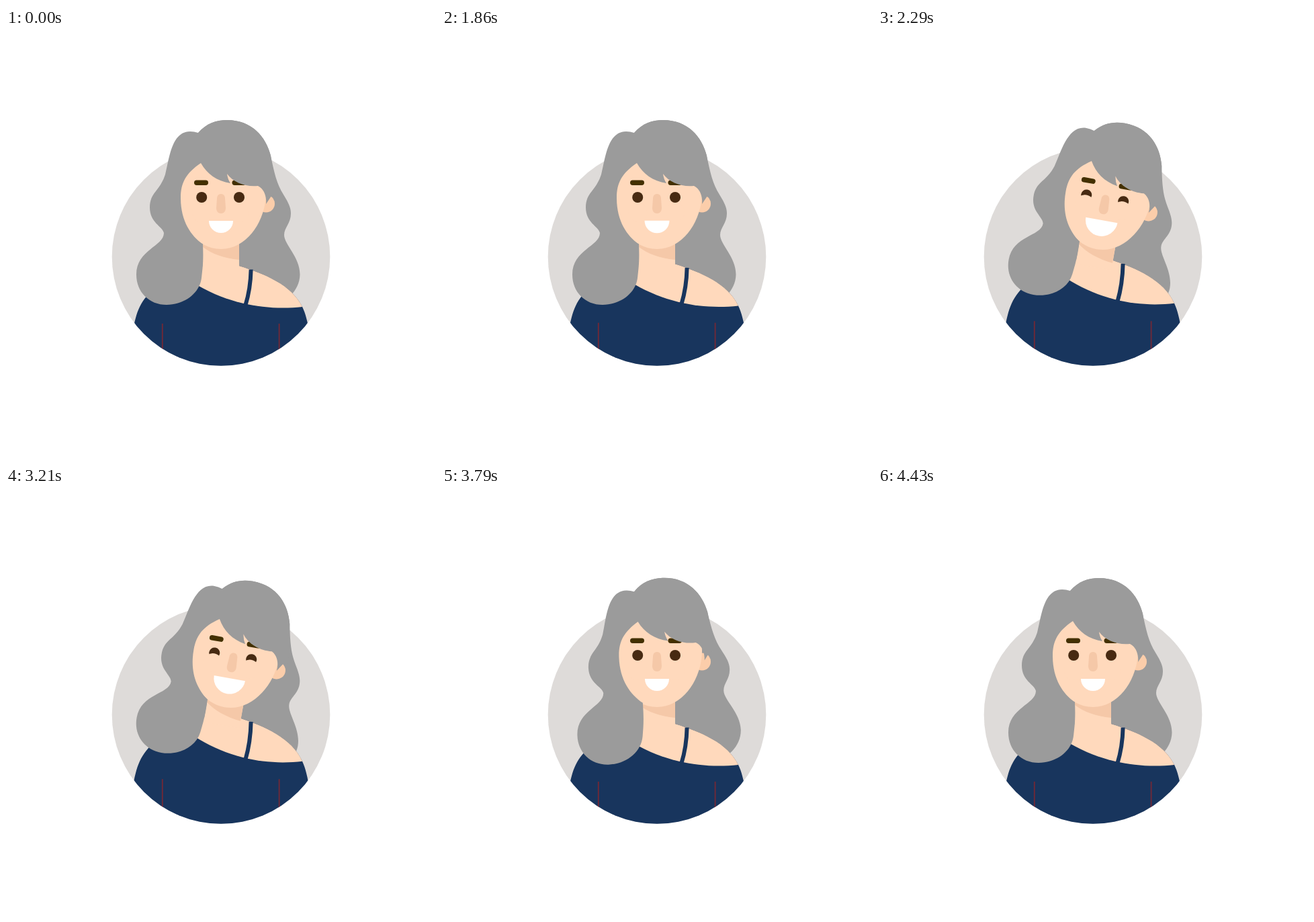
Animation of 640x640 px, one loop 4780 ms. Source, as an HTML page:

```html
<!DOCTYPE html>
<html lang="en">
<head>
<meta charset="utf-8">
<title>Smiling woman</title>
<style>
  html, body { margin: 0; width: 100%; height: 100%; overflow: hidden; background: #fff; }
  svg { display: block; width: 100vw; height: 100vh; }
  .hair { fill: #9b9b9b; }
  .skin { fill: #ffd9bc; }
  .shade { fill: #f5c8a8; }
  .ear { fill: #fbcdaa; }
  .dress { fill: #18355d; }
  .strap { fill: none; stroke: #18355d; stroke-width: 6; }
  .seam { fill: none; stroke: #722836; stroke-width: 1.8; }
  .brow { fill: #433000; }
  .eye { fill: #472a12; }
  .mouth { fill: #fff; }
</style>
</head>
<body>
<svg viewBox="0 0 640 640">
  <defs>
    <clipPath id="disc"><circle cx="320" cy="340.5" r="162.3"/></clipPath>
  </defs>
  <circle cx="320" cy="340.5" r="162.3" fill="#dedbd9"/>

  <g class="tilt"><g class="swing">
    <path class="hair" d="M286 156C298 142 313 137 329 137C366 137 387 162 394 190
      C399 215 403 232 413 248C421 261 424 268 424 276C424 291 414 297 414 308
      C414 322 437.500 341 437.500 367C437 392 415 410 395 412L300 395L265 200Z"/>
  </g></g>

  <g clip-path="url(#disc)"><g id="body">
    <path class="dress" d="M347 354C385 366 425 382 441 415C446 425 449 438 452 455V520H188V455
      C191 438 194 425 199 415C215 382 255 366 293 354Z"/>
    <path class="skin" d="M347 354C385 366 425 382 441 415C395 420 340 414 287 384L262 368L293 354Z"/>
    <path class="strap" d="M364.600 359.500Q364 388 356.300 413"/>
    <path class="seam" d="M232.800 440V520M406.600 440V520"/>
  </g></g>

  <g class="tilt">
    <path class="skin" d="M293 300H347V356H293Z"/>
    <path class="shade" d="M293 305H347V345C325 343 306 336 293 326Z"/>
    <circle class="ear" cx="387" cy="261.500" r="13"/>
    <path class="skin" d="M387 245C387 285 360 329 320 329C280 329 253 285 253 245
      C253 200 280 180 320 180C360 180 387 200 387 245Z"/>
    <rect class="brow" x="280" y="226.500" width="21" height="7.500" rx="3.700"/>
    <rect class="brow" x="336.500" y="226.500" width="20.500" height="7.500" rx="3.700"/>
    <g id="eyes">
      <circle class="eye" cx="291.200" cy="252" r="8"/>
      <circle class="eye" cx="347" cy="252" r="8"/>
    </g>
    <g id="cheeks">
      <circle class="skin" cx="291.200" cy="266" r="14"/>
      <circle class="skin" cx="347" cy="266" r="14"/>
    </g>
    <path class="shade" d="M320 247C324 247 326 250 326 254L327 268C327 273 324 276 320 276
      C316 276 313 273 313 268L314 254C314 250 316 247 320 247Z"/>
    <path id="mouth" class="mouth" d="M302 287H338A18 18 0 0 1 302 287Z"/>
    <g class="swing">
      <path class="hair" d="M286 156C298 142 313 137 329 137C366 137 387 162 394 190L402 249L395 250L387 262
        C388 252 385 240 375 235C357 237 338 230 329 217Q330 225 334 231
        C314 228 299 217 290 201C268 216 260 230 260 253C260 287 275 309 293 322
        C294 345 293 355 291 372C288 396 264 412 239 412C213 412 194 393 194 367
        C194 330 235 325 235 305C233 295 214 290 214 267C214 245 229 243 237 218
        C243 195 246 154 274 154Q280 154 286 156Z"/>
    </g>
  </g>
</svg>
<script>
  const LOOP = 4780, STEPS = 67;
  const smooth = p => p < .5 ? 2 * p * p : 1 - 2 * (1 - p) * (1 - p);
  const easeOut = p => 1 - (1 - p) * (1 - p);

  // Keys: [step, value, easing towards it]
  const tracks = {
    blink: [[6, 1], [8, .1], [9, .1], [11, 1]],
    stretch: [[25, 0], [31, 1, easeOut], [48, 1], [53, 0]],
    smile: [[25, 0], [30, 1], [44, 1], [49, 0]],
    tilt: [[26, 0], [32, 10], [47, 10], [53, 0]],
    swing: [[50, 0], [53, -2], [54, -2.4], [57, 1], [60, -.5], [62, 0]]
  };

  function valueAt(keys, step) {
    if (step <= keys[0][0]) return keys[0][1];
    for (let i = 1; i < keys.length; i++) {
      const [from, a] = keys[i - 1], [to, b, ease = smooth] = keys[i];
      if (step <= to) return a + (b - a) * ease((step - from) / (to - from));
    }
    return keys[keys.length - 1][1];
  }

  function move(selector, transform) {
    document.querySelectorAll(selector).forEach(el => el.setAttribute("transform", transform));
  }
  const scaleAt = (x, y, sx, sy) => `translate(${x} ${y}) scale(${sx} ${sy}) translate(${-x} ${-y})`;

  function pose(step) {
    const at = name => valueAt(tracks[name], step);
    const smile = at("smile"), grin = 1 + .33 * smile;
    move(".tilt", `rotate(${at("tilt")} 321 359)`);
    move(".swing", `rotate(${at("swing")} 320 156)`);
    move("#body", scaleAt(0, 503, 1, 1 + .06 * at("stretch")));
    move("#eyes", scaleAt(0, 252, 1, at("blink")));
    move("#cheeks", `translate(0 ${9 * (1 - smile)})`);
    move("#mouth", scaleAt(320, 293, grin, grin));
  }

  // Motion runs in even steps, about 14 per second.
  let shown = -1;
  function tick() {
    const step = Math.floor((performance.now() % LOOP + 4) * STEPS / LOOP) % STEPS;
    if (step !== shown) pose(shown = step);
    requestAnimationFrame(tick);
  }
  tick();
</script>
</body>
</html>
```
